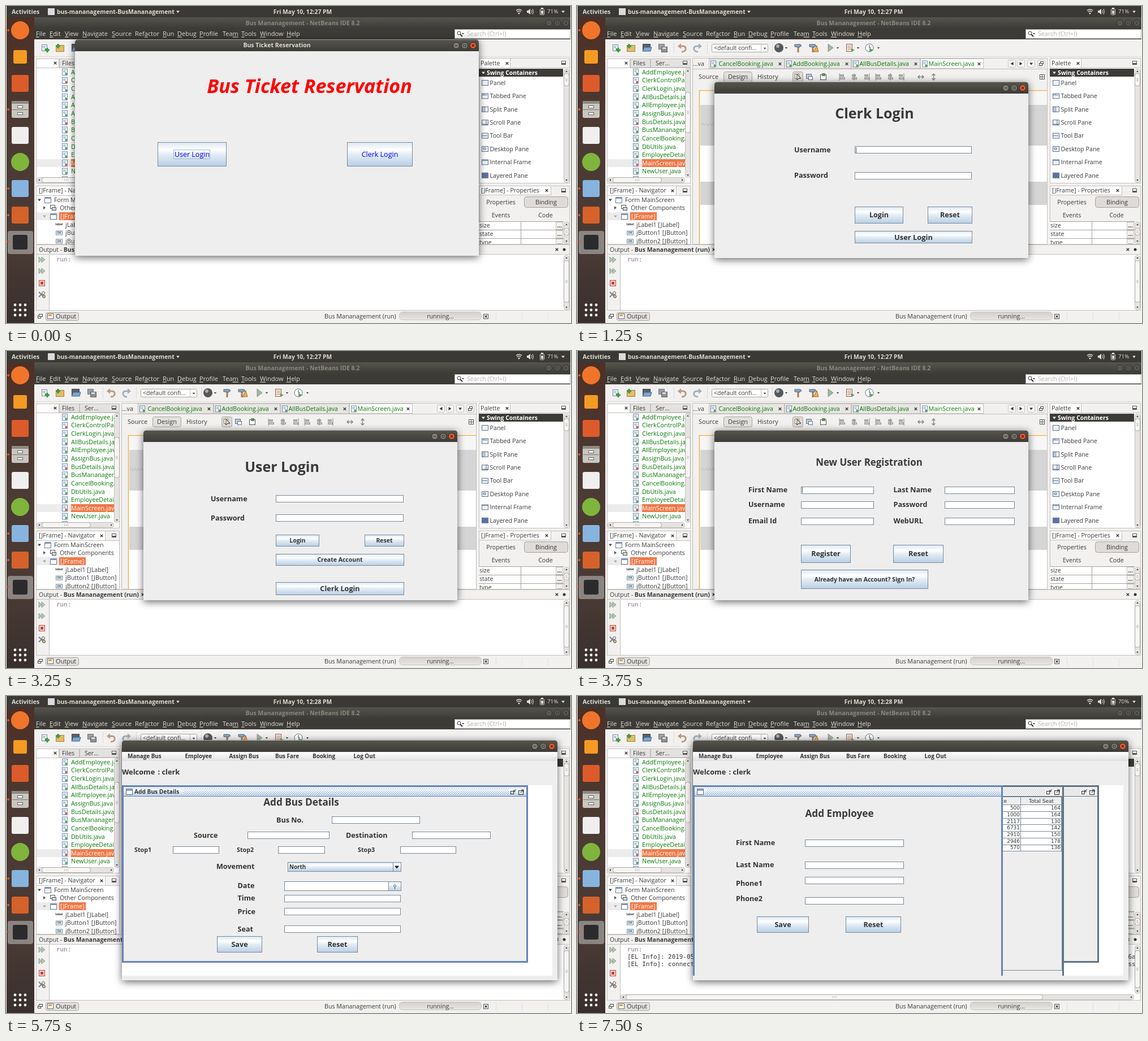
An HTML page for the animation above (8 s loop, 999 px wide and 561 px high).

```html
<!DOCTYPE html>
<html lang="en">
<head>
<meta charset="utf-8">
<title>Bus Ticket Reservation</title>
<style>
html, body { margin: 0; width: 100%; height: 100%; overflow: hidden; background: #fff; }
svg { display: block; }
text { font-family: "Open Sans", "Noto Sans", sans-serif; white-space: pre; }
.mono { font-family: "DejaVu Sans Mono", monospace; }
.cell { font-family: "DejaVu Sans", sans-serif; }
.bold { font-weight: 700; }
.mid { text-anchor: middle; }
.end { text-anchor: end; }
.slant { font-style: italic; }
.shade { filter: drop-shadow(0 3px 7px #0009); }
</style>
</head>
<body>
<svg id="stage" width="999" height="561"></svg>
<script>
const DARK = '#3c3b37', PALE = '#dfdbd2', PANEL = '#f2f1f0', LINE = '#c4c0bb', STEEL = '#7a8a99', ORANGE = '#f07746';

// Basic shapes; boxes are given by left, top, right, bottom
const rect = (x, y, X, Y, fill, stroke, r = 0) => {
  const o = stroke ? .5 : 0;
  return `<rect x="${x + o}" y="${y + o}" width="${X - x - 2 * o}" height="${Y - y - 2 * o}" rx="${r}" fill="${fill}" stroke="${stroke || 'none'}"/>`;
};
const path = (d, stroke = '#444', fill = 'none', w = 1) => `<path d="${d}" stroke="${stroke}" fill="${fill}" stroke-width="${w}"/>`;
const dot = (x, y, r, fill, stroke = 'none') => `<circle cx="${x}" cy="${y}" r="${r}" fill="${fill}" stroke="${stroke}"/>`;
const text = (x, y, s, size = 10.7, fill = '#3a3a3a', cls = '') =>
  `<text x="${x}" y="${y + size * .357}" font-size="${size}" fill="${fill}" class="${cls}">${s}</text>`;
const bold = (x, y, s, size = 12.6, fill = '#333', cls = '') => text(x, y, s, size, fill, 'bold ' + cls);
const each = (list, fn) => list.map(fn).join('');
const clip = (id, s) => `<g clip-path="url(#${id})">${s}</g>`;

// Desktop widgets
const cross = (x, y, c = '#333', r = 2.3) => path(`M${x - r} ${y - r}l${2 * r} ${2 * r}m0 ${-2 * r}l${-2 * r} ${2 * r}`, c, 'none', 1.3);
const caret = (x, y, c = '#444', r = 3) => path(`M${x - r} ${y - r / 2}h${2 * r}l${-r} ${r * 1.3}z`, 'none', c);
const arrow = (x, y, dx, c = '#555') => path(`M${x - dx} ${y - 3}v6l${2 * dx} -3z`, 'none', c);
const minimise = (x, y) => rect(x - 4, y - 3, x + 4, y + 4, '#fff', '#555') + rect(x - 3, y + 1, x + 3, y + 3, '#555');
const thumb = (x, y, X, Y) => rect(x, y, X, Y, '#f6f5f4', '#aaa6a0', 4);
const vbar = (x, y, Y, t, T) => rect(x, y, x + 10, Y, '#e6e4e2', LINE, 4) + thumb(x, t, x + 10, T) +
  path(`M${x + 3} ${y + 6}l2 -3l2 3zM${x + 3} ${Y - 6}l2 3l2 -3z`, 'none', '#555') +
  path(`M${x + 3} ${(t + T) / 2 - 2}h4m-4 2h4m-4 2h4`, LINE);
const hbar = (x, y, X, t, T) => rect(x, y, X, y + 10, '#e6e4e2', LINE, 4) + thumb(t, y, T, y + 10) +
  path(`M${x + 6} ${y + 3}l-3 2l3 2zM${X - 6} ${y + 3}l3 2l-3 2z`, 'none', '#555') +
  path(`M${(t + T) / 2 - 3} ${y + 3}v4m3 -4v4m3 -4v4`, LINE);
const page = (x, y, mark = '#4f9a4f') => rect(x - 5, y - 6, x + 5, y + 6, '#f4f8fc', '#7188a3') +
  path(`M${x - 3} ${y - 2.5}h5m-5 2h4`, '#7f9dbf') + arrow(x + 3, y + 3, 2.2, mark);
const frameIcon = (x, y) => rect(x - 6, y - 5, x + 6, y + 6, '#fff', '#66758a') + rect(x - 6, y - 5, x + 6, y - 2, '#7f93b0');
const panel = (x, y, X, Y) => rect(x, y, X, Y, '#fff', LINE);
const plus = (x, y) => path(`M${x - 4} ${y}h8m-4 -4v8`, '#3c9a3c', 'none', 3);

const circles = (right, y, live) => each([40, 25, 10], (d, i) => {
  const x = right - d, c = live ? (i == 2 ? '#5c1f0c' : '#2f2e2b') : DARK;
  const glyph = [path(`M${x - 2.5} ${y}h5`, c), path(`M${x - 2} ${y - 2}h4v4h-4z`, c), cross(x, y, c, 2)][i];
  return dot(x, y, 5.5, live ? (i == 2 ? '#ee5a2c' : '#807d76') : '#5b5953', '#32312e') + glyph;
});

// Swing widgets
const field = (x, y, X, Y = y + 13) => rect(x, y, X, Y, '#fff', STEEL);
const button = (x, y, X, Y, s, size = 12.6, fill = '#333', cls = 'bold') =>
  rect(x, y, X, Y, 'url(#ocean)', STEEL) + text((x + X) / 2, (y + Y) / 2, s, size, fill, 'mid ' + cls);
const cursor = (x, y) => path(`M${x}.5 ${y}v10`, '#555');
const label = (x, y, s) => bold(x, y, s);
const heading = (x, y, s, size) => bold(x, y, s, size, '#3a3a3a', 'mid');

const dialog = (x, y, X, Y, body, title = '') =>
  rect(x, y, X, Y, '#eee', '', 4).replace('<rect', '<rect class="shade"') +
  path(`M${x} ${y + 21.5}v-16q0 -5 5 -5H${X - 5}q5 0 5 5v16z`, 'none', 'url(#title)') +
  rect(x, y + 21, X, Y, '#eee') + bold((x + X) / 2, y + 10.5, title, 10.5, PALE, 'mid') + circles(X, y + 11, true) + body;

function menuBar() {
  const items = '_File 53,_Edit 77,_View 104,_Navigate 135,_Source 187,Ref_actor 228,_Run 277,_Debug 303,_Profile 342,Tea_m 383,_Tools 416,_Window 449,_Help 496';
  return each(items.split(','), item => {
    const [name, x] = item.split(' ');
    return text(+x, 49.5, name.replace(/_(.)/, '<tspan text-decoration="underline">$1</tspan>'), 11, PALE);
  });
}

function dock() {
  const tile = (y, fill, r = 15) => rect(25 - r, y - r, 25 + r, y + r, fill, '', 3);
  return rect(1, 20, 50, 561, 'url(#dock)') +
    rect(3, 398, 48, 439, '#8b8582', '', 4) +
    dot(25, 43, 16, '#f0752b') + tile(90, '#f59a23', 12) + tile(137, '#dd5b2b') +
    tile(183, '#c9c6c0') + rect(10, 168, 40, 173, '#8d8983') + path('M11 183.5h28', '#77736e') +
    each([178, 190], y => rect(20, y - 2, 30, y + 3, '#fff', '#66625d')) +
    tile(229, '#f1efee') + dot(25, 276, 16, '#7fb53c') + tile(323, '#86b4de') + tile(370, '#d4622a') + tile(418, '#2b2b2e', 13) +
    each([43, 183, 323, 370, 417], y => dot(4, y, 2, '#e95420')) +
    each([0, 1, 2, 3, 4, 5, 6, 7, 8], i => dot(16 + i % 3 * 9, 529 + (i / 3 | 0) * 9, 2.4, '#f4f2f0'));
}

function topPanel() {
  return rect(1, 0, 998, 20, '#3a3935') + bold(10, 10, 'Activities', 10.6, PALE) + rect(74, 4, 86, 16, '#dcdcdc') +
    bold(90, 10, 'bus-mananagement-BusMananagement', 10.35, PALE) + caret(304, 10, PALE) +
    `<g id="clock"></g><g id="battery"></g>` +
    path('M902 8q5 -4 10 0M903.5 10.5q3.500 -3 7 0', PALE, 'none', 1.5) + dot(907, 13, 1.5, PALE) +
    path('M921 8h2l4 -3v10l-4 -3h-2z', 'none', PALE) + path('M929 7q2 3 0 6m2 -8q3 5 0 10', PALE) +
    rect(944, 5, 952, 16, 'none', PALE, 1) + rect(946, 8, 950, 14, PALE) + rect(946, 3, 950, 5, PALE) + caret(985, 10, PALE);
}

function toolbar() {
  return page(68, 74) + plus(73, 78) + rect(88, 69, 103, 81, '#e3bd6a', '#a57e35') + plus(92, 71) +
    rect(116, 67, 130, 80, '#59626b', '#444') + path('M116 80l3 -7h13l-2 7z', '#3f638a', '#7fa6d0') +
    rect(144, 67, 155, 77, '#9aa0a6', '#777') + rect(149, 72, 160, 82, '#8a9096', '#666') + rect(151, 73, 157, 76, '#ddd') +
    path('M180 71h7q6 0 5 6q-1 4 -7 4', '#b99a80', 'none', 3) + path('M178 71l6 -5v10z', 'none', '#b99a80') +
    path('M219 71h-7q-6 0 -5 6q1 4 7 4', '#9fb0bf', 'none', 3) + path('M221 71l-6 -5v10z', 'none', '#9fb0bf') +
    rect(238, 67, 338, 82, '#fff', '#a9a49e', 2) + text(242, 74.500, '&lt;default confi...', 10.5) + path('M325.500 68v13', LINE) + caret(332, 75, '#555', 2.500) +
    dot(357, 74, 8, '#55585a') + dot(355, 71, 3, '#a9adb0') +
    each([391, 417], x => path(`M${x} 71v11`, '#b07a4a', 'none', 3) + path(`M${x - 6} 72v-4h10l2 3h-3v2z`, '#46627d', '#8fa8bf')) +
    path('M424 70l-6 11h9z', '#b07030', '#e5ac55') + path('M444 67v14l9 -7z', '#8d9b8d', '#a4b3a2') +
    rect(476, 67, 487, 81, '#f6f2e8', '#8a5f55') + path('M478 71h7m-7 3h7m-7 3h7', '#c26a5a') + arrow(488, 78, 3, '#58a158') +
    dot(517, 74, 7, '#fff', '#56708f') + path('M517 69v5h3', '#444') + arrow(521, 78, 4, '#58a158') +
    each([370, 461, 497, 533], x => caret(x, 74, '#444', 2.2)) +
    each([171.500, 230.500, 345.500], x => path(`M${x} 64v20`, '#dedbd8'));
}

function files() {
  const names = 'AddEmployee.java,ClerkControlPanel.java,ClerkLogin.java,AllBusDetails.java,AllEmployee.java,AssignBus.java,BusDetails.java,BusMananagement.java,CancelBooking.java,DbUtils.java,EmployeeDetails.java,MainScreen.java,NewUser.java,ShowUserDetails.java';
  return panel(53, 109, 201, 314) + rect(53, 93, 94, 110, '#fff', LINE) + rect(94, 93, 130, 109, '#e4e2e0', LINE) + rect(130, 93, 201, 109, '#e4e2e0', LINE) +
    cross(87, 101) + text(99, 101, 'Files') + text(139, 101, 'Ser...') + minimise(191, 100) +
    rect(54, 271, 115, 285, '#ececec') +
    clip('list', rect(115, 271, 191, 285, ORANGE) + each(names.split(','), (name, i) => {
      const y = 117 + i * 14.63;
      return page(104, y, i % 5 == 1 ? '#c05040' : '#4f9a4f') + text(115, y, name, 10.8, i == 11 ? '#fff' : '#087a08');
    })) + vbar(191, 110, 304, 152, 225) + hbar(54, 303, 191, 63, 150);
}

function navigator() {
  return panel(53, 335, 201, 422) + rect(53, 318, 201, 336, PANEL, LINE) + rect(53, 318, 176, 336, '#fff', LINE) +
    text(58, 326.500, '[JFrame] - Navigator') + cross(169, 327) + minimise(191, 326) +
    caret(59, 343) + frameIcon(74, 343) + text(85, 343, 'Form MainScreen') +
    arrow(68, 357, 2) + rect(78, 352, 87, 359, '#fff', '#555') + rect(81, 356, 89, 362, '#cfd8e4', '#555') + text(95, 357.500, 'Other Components') +
    rect(54, 365, 94, 379, '#ececec') + caret(68, 372, '#aaa') + frameIcon(84, 372) + rect(94, 365, 141, 379, ORANGE) + text(96, 372, '[JFrame]', 10.7, '#fff') +
    bold(94, 386, 'label', 5.500, '#333', 'mid') + text(105, 387, 'jLabel1 [JLabel]') +
    each([1, 2], i => { const y = 387 + i * 14.6; return rect(88, y - 4, 100, y + 4, '#e8eef5', '#7a8fa5') + bold(94, y, 'OK', 5, '#456', 'mid') + text(105, y, `jButton${i} [JButton]`); });
}

function editor() {
  const tabs = [['CancelBooking.java', 233, 367], ['AddBooking.java', 367, 485], ['AllBusDetails.java', 485, 607], ['MainScreen.java', 607, 719]];
  const nav = [[769, -2.500], [785, 2.500]];
  return rect(204, 92, 832, 422, PANEL, LINE) + text(205, 102.500, '...va') +
    each(tabs, ([name, x, X], i) => rect(x, 93, X, 111, i == 3 ? '#fff' : '#e8e6e4', LINE) + page(x + 8, 102.500) +
      text(x + (i ? 14.500 : 17.500), 102.500, name, 10.7, '#087a08') + cross(X - 8, 102.500)) +
    each([762, 778, 796, 814], x => rect(x, 95, x + 14, 109, '#f7f6f5', LINE, 2)) +
    each(nav, ([x, d]) => arrow(x, 102, d, '#333')) + caret(803, 102, '#333') + rect(819, 98, 825, 103, '#fff', '#444') + rect(817, 101, 823, 106, '#fff', '#444') +
    path('M205 111.500h627', LINE) + text(215, 125.500, 'Source', 11) + rect(259, 116, 310, 135, '#e3e1df', '#a9a49e', 3) + text(267, 125.500, 'Design', 11) + text(319, 125.500, 'History', 11) +
    rect(381, 116, 400, 135, '#dcd9d6', '#a9a49e', 3) + rect(385, 120, 393, 129, '#fff', '#8a7a50') + path('M389 121v10l3 -3h4z', '#222', '#fff') +
    rect(405, 120, 415, 129, '#b9cbe0', '#66758a') + rect(409, 124, 417, 131, '#fff', '#66758a') + rect(430, 121, 441, 131, '#fff', '#555') + rect(433, 119, 439, 124, '#5d8a5d') +
    each([469, 490, 512, 533, 554, 573], (x, i) => rect(x - 4, 121, x + 3, 125, '#b8b6b4', '#999') + rect(x - 4, 126, x + 5, 130, '#c9c7c5', '#999') + path(`M${x + (i % 3 - 1) * 5} 119v13`, '#888')) +
    path('M603 125.500h10m-7 -3l-3 3l3 3m4 -6l3 3l-3 3M630.500 120v11m-3 -8l3 -3l3 3m-6 5l3 3l3 -3', '#888', 'none', 1.5) + rect(818, 121, 827, 130, '#fff', '#555') + path('M822.500 121v9m-4 -4.500h8', '#555') +
    rect(205, 138, 831, 421, '#fff') + rect(205, 138, 216, 421, PANEL) + rect(205, 138, 831, 148, PANEL) +
    path('M216.500 421V149.500H831', '#efae4a', 'none', 1.5) + rect(218, 151, 831, 175, '#f6f6f6') + rect(218, 175, 831, 247, '#d5d5d5') + rect(218, 311, 831, 352, '#d5d5d5') +
    path('M219 212' + 'l3 -5l3 5'.repeat(5), '#bfbfbf');
}

function palette() {
  const names = ['Panel', 'Tabbed Pane', 'Split Pane', 'Scroll Pane', 'Tool Bar', 'Desktop Pane', 'Internal Frame', 'Layered Pane'];
  const detail = ['', 'M842 134h9m-6 -2v2', 'M846.500 131v10m-3 -10v10', 'M849 131v10m-7 -2h10', 'M842 136h9', 'M844 134h4v3h-4z', 'M842 133h10', 'M844 134h4v4h-4z'];
  return panel(836, 109, 997, 314) + rect(836, 92, 997, 110, PANEL, LINE) + rect(836, 92, 892, 110, '#fff', LINE) + text(839, 101.500, 'Palette') + cross(886, 101.500) + minimise(986, 100) +
    rect(836, 111, 985, 125, DARK) + caret(844, 118, '#fff') + bold(850, 118, 'Swing Containers', 10.4, '#fff') +
    each(names, (name, i) => `<g transform="translate(0 ${i * 23.4})">` + rect(841, 131, 853, 141, i == 7 ? '#5b78b5' : '#eef2f7', '#5f6f85') + path(detail[i], '#53698c') + text(855.500, 136, name) + '</g>') +
    vbar(986, 111, 313, 119, 142);
}

function properties() {
  return rect(836, 318, 997, 422, PANEL, LINE) + rect(836, 318, 964, 335, '#fff', LINE) + text(840, 326.500, '[JFrame] - Properties') + cross(956, 326.500) + minimise(986, 326) +
    text(875, 347, 'Properties', 10.7, '#3a3a3a', 'mid') + rect(916, 337, 994, 357, '#dedbd8', '#a9a49e', 4) + text(955, 347, 'Binding', 10.7, '#3a3a3a', 'mid') +
    text(875, 370, 'Events', 10.7, '#3a3a3a', 'mid') + text(954, 370, 'Code', 10.7, '#3a3a3a', 'mid') + rect(836, 381, 986, 421, '#fff') +
    clip('props', each(['size', 'state', 'type'], (name, i) => {
      const y = 381 + i * 15;
      return path(`M836 ${y + .5}h150`, '#a5a29e') + text(837, y + 7.500, name) + rect(972, y + 1, 985, y + 15, PANEL, LINE) + bold(978.500, y + 7, '...', 10, '#333', 'mid');
    })) + path('M910.500 381v40', '#a5a29e') + vbar(986, 382, 421, 393, 406);
}

function output() {
  return rect(53, 422, 997, 440, PANEL, LINE) + text(58, 431, 'Output - <tspan class="bold">Bus Mananagement (run)</tspan>', 10.5) + cross(242, 431) + cross(974, 431) + dot(987, 431, 2.500, '#333') +
    rect(53, 439, 997, 539, '#fff', LINE) + rect(54, 440, 77, 538, PANEL) + path('M76.500 440v98', LINE) +
    each([449, 469], y => path(`M58 ${y - 5}v10l5 -5zM63 ${y - 5}v10l6 -5z`, '#8fa08f', '#b5c8b3')) +
    rect(58, 485, 69, 496, '#f2d4d0', '#b5483f') + rect(61, 488, 66, 493, '#d0453c') +
    path('M58 506l9 9m0 -9l-9 9', '#78828c', 'none', 2) + dot(66, 508, 2.500, '#fff', '#555') + dot(67, 514, 2.500, '#d8c27a', '#555') +
    text(89, 448.500, 'run:', 10.9, '#8a6f8a', 'mono') + vbar(986, 441, 538, 450, 525) +
    rect(56, 548, 62, 553, '#fff', '#444') + rect(58, 545, 65, 550, '#fff', '#444') +
    rect(70, 542, 129, 557, '#e3e1df', '#a9a49e', 3) + rect(73, 544, 84, 554, '#fff', '#667') + rect(75, 546, 81, 549, '#e1a23d') + text(88, 549.500, 'Output', 10.9) +
    text(563, 549, 'Bus Mananagement (run)', 10.7) + rect(695, 541, 841, 556, 'url(#trough)', '#c9c5c0', 6) + '<g id="progress"></g>' +
    rect(844, 545, 853, 554, '#fff', '#555') + cross(848.500, 549.500, '#333', 2) + path('M866.500 543v14m46 -14v14m46 -14v14', '#e2dfdc');
}

const desktop = () => rect(1, 20, 998, 561, PANEL) + rect(50, 20, 998, 40, 'url(#title)') + rect(50, 40, 998, 59, DARK) +
  bold(524.500, 30, 'Bus Mananagement - NetBeans IDE 8.2', 10.5, '#8b8881', 'mid') + circles(1000, 30, false) + menuBar() +
  rect(793, 41, 998, 58, '#fff', '#aaa') + dot(801, 48, 3, 'none', '#333') + path('M803 50l4 4', '#333', 'none', 2) + caret(808, 49, '#333', 2) + text(815, 49.500, 'Search (Ctrl+I)', 10.7, '#b3b0ad') +
  toolbar() + path('M50 89.500h948', '#dedbd8') + files() + navigator() + editor() + palette() + properties() + output() + dock() + topPanel();

const home = () => dialog(122, 59, 836, 442,
  text(536.500, 142, 'Bus Ticket Reservation', 34, '#f00', 'bold slant mid') +
  button(268, 241, 390, 284, 'User Login', 12.500, '#00f', '') + rect(296, 254, 361, 271, 'none', '#a3b8cc') +
  button(603, 241, 719, 284, 'Clerk Login', 12.500, '#00f', ''), 'Bus Ticket Reservation');

const staffLogin = () => dialog(243, 134, 798, 446, heading(526, 190, 'Clerk Login', 25) +
  label(384, 254.500, 'Username') + label(384, 300, 'Password') + field(491, 248, 698) + field(491, 294, 698) + cursor(493, 250) +
  button(491, 355, 577, 385, 'Login') + button(620, 355, 699, 385, 'Reset') + button(491, 398, 699, 420, 'User Login', 12.9));

const userLogin = () => dialog(243, 140, 798, 441, heading(488, 205, 'User Login', 25) +
  label(362, 261.500, 'Username') + label(362, 295.500, 'Password') + field(477, 255, 703) + field(477, 289, 703) +
  button(477, 325, 554, 346, 'Login', 10.500) + button(634, 325, 704, 346, 'Reset', 10.500) +
  button(477, 359, 704, 380, 'Create Account', 10.500) + button(477, 409, 704, 432, 'Clerk Login'));

const register = () => dialog(243, 140, 798, 441, heading(516.500, 197, 'New User Registration', 16.9) +
  each([['First Name', 'Last Name', 246], ['Username', 'Password', 271.500], ['Email Id', 'WebURL', 300.500]], ([a, b, y]) =>
    label(303, y, a) + label(559.500, y, b) + field(396, Math.round(y - 6), 525) + field(650, Math.round(y - 6), 774)) + cursor(398, 241) +
  button(396, 343, 484, 375, 'Register') + button(559, 343, 648, 375, 'Reset') + button(396, 387, 621, 421, 'Already have an Account? Sign In?', 10.500));

// Windows inside the main control panel
function inner(X, Y, title, active, body, controls = true) {
  const edge = active ? '#6382bf' : '#5f7383', bumps = title ? 235 + title.length * 5.2 : 230;
  return rect(205, 158, X, Y, edge) + rect(208, 161, X - 3, Y - 3, '#eee') + rect(208, 162, X - 3, 177, active ? 'url(#ocean)' : '#eee') +
    rect(bumps, 164, X - (controls ? 33 : 5), 176, `url(#${active ? 'bumps' : 'dull'})`) + path(`M208 177.500H${X - 3}`, edge) +
    rect(212, 164, 224, 175, '#fff', '#5a6a80') + path('M213 166.500h10', '#6382bf', 'none', 2) + bold(227, 169, title, 10.2) +
    (controls ? rect(X - 31, 168, X - 25, 174, 'none', '#333') + path(`M${X - 21} 165l-4 4m0 -3v3h3`, '#222') + rect(X - 17, 167, X - 8, 175, 'none', '#333') + path(`M${X - 13} 171l5 -5m-4 0h4v4`, '#222') : '') + body;
}

const addBus = active => inner(923, 472, 'Add Bus Details', active, heading(522, 187.500, 'Add Bus Details', 17.2) +
  label(478, 220, 'Bus No.') + field(576, 213, 732) + label(332, 246.500, 'Source') + field(427, 240, 572) + label(601, 246.500, 'Destination') + field(718, 240, 857) +
  each([[227, 295, 377], [408, 481, 564], [622, 697, 796]], ([x, l, r], i) => bold(x, 272.500, 'Stop' + (i + 1), 10.700) + field(l, 266, r)) +
  label(372, 302, 'Movement') + rect(498, 294, 699, 311, 'url(#ocean)', STEEL) + bold(501, 302.500, 'North', 9.800) + path('M684.500 294v17', STEEL) + caret(691, 302.500, '#222', 4) +
  label(409.500, 336, 'Date') + field(492, 328, 677, 345) + button(676, 328, 699, 345, '') + dot(687.500, 336, 2, '#fff', '#456') + path('M687.500 338v4', '#456') +
  each([['Time', 358, 352], ['Price', 381.500, 375], ['Seat', 412.500, 406]], ([s, y, top]) => label(409.500, y, s) + field(492, top, 698)) +
  button(373, 425, 453, 454, 'Save') + button(550, 425, 622, 454, 'Reset'));

function allBuses(active) {
  const heads = 'Id,Bus No,Movement,Bus Source,Bus Dest,Depart Date,Depart Time,Price,Total Seat'.split(',');
  const rows = `MH-3621,Item 2,Howrah,Bokaro,1 Jun,500,164
WB-5621,North,Ranchi,Lucknow,6 May,1000,164
HY-7234,North,Jharkhand,Haryana,17 May,2117,130
JH-8451,South,Kalyani,Hydrabad,14 Jun,6731,142
WB-4518,West,Delhi,Mumbai,12 Jul,2910,150
MH-67533,South,Bilaspur,Banglore,11 Jun,2946,178
DH-9106,East,Delhi,Bihar,7 Jul,570,136`.split('\n');
  const left = i => 209 + i * 72, size = 8.950;
  return inner(861, 499, 'All Bus Details', active, rect(208, 178, 858, 486, '#eee', STEEL) + rect(209, 192, 857, 274, '#fff') +
    each(heads, (s, i) => text(left(i) + 36, 185.500, s, size, '#333', 'cell mid') + path(`M${left(i + 1) - .5} 178v96`, STEEL)) + path('M209 192.500h648', STEEL) +
    each(rows, (row, r) => {
      const [no, way, from, to, day, price, seats] = row.split(','), y = 198 + r * 11.7;
      return path(`M209 ${Math.round(y + 6) + .5}h648`, STEEL) + each([r + 1, no, way, from, to, day + ', 2019', '1 Jan, 1970', price, seats], (s, i) =>
        i % 7 && i < 8 ? text(left(i) + 1, y, s, size, '#333', 'cell') : text(left(i + 1) - 2, y, s, size, '#333', 'cell end'));
    }));
}

const addEmployee = () => inner(753, 499, '', true, heading(464, 207.500, 'Add Employee', 17.2) +
  each([['First Name', 260, 254], ['Last Name', 299, 293], ['Phone1', 331.500, 320], ['Phone2', 359, 356]], ([s, y, top]) => label(281, y, s) + field(403, top, 578)) +
  button(318, 390, 410, 419, 'Save') + button(475, 390, 573, 419, 'Reset'), false);

const controlPanel = frames => dialog(205, 78, 975, 503, rect(205, 99, 975, 115, 'url(#menu)') +
  each([['Manage Bus', 215], ['Employee', 316.500], ['Assign Bus', 394.500], ['Bus Fare', 476], ['Booking', 542], ['Log Out', 614.500]], ([s, x]) => bold(x, 106.500, s, 9.900)) +
  bold(205, 134.500, 'Welcome', 12.8) + bold(268.500, 134.500, ':', 12.8) + bold(275.500, 134.500, 'clerk', 12.8) +
  rect(205, 158, 966, 495, '#fff') + clip('pane', frames));

const log = () => rect(78, 440, 996, 538, '#fff') + text(89, 448.500, 'run:', 10.9, '#8a6f8a', 'mono') +
  each([['2019-05-10', 'd6a', 461], ['connected', 'ass', 474.500]], ([a, b, y]) => text(89, y, '[EL Info]: ' + a, 10.9, '#333', 'mono') + text(968, y, b, 10.9, '#333', 'mono')) +
  vbar(986, 441, 527, 450, 517) + hbar(77, 528, 985, 86, 824);

const gradient = (id, ...stops) => `<linearGradient id="${id}" x2="0" y2="1">${each(stops, ([at, c]) => `<stop offset="${at}" stop-color="${c}"/>`)}</linearGradient>`;
const area = (id, ...box) => `<clipPath id="${id}">${rect(...box, '#000')}</clipPath>`;
const bumps = (id, c) => `<pattern id="${id}" width="4" height="4" patternUnits="userSpaceOnUse"><path d="M0 0h1v1h-1zM2 2h1v1h-1z" fill="${c}"/><path d="M1 1h1v1h-1zM3 3h1v1h-1z" fill="#fff"/></pattern>`;
const defs = gradient('title', [0, '#56544d'], [1, '#3c3b37']) + gradient('dock', [0, '#4d3026'], [.4, '#4b3b34'], [.75, '#4a3a34'], [1, '#38302e']) +
  gradient('ocean', [0, '#dde8f3'], [.3, '#fff'], [.5, '#e4edf5'], [1, '#b8cfe5']) + gradient('trough', [0, '#d3d0cc'], [1, '#e8e6e4']) + gradient('menu', [0, '#fff'], [1, '#e0e0e0']) +
  area('list', 54, 110, 191, 303) + area('props', 836, 381, 986, 421) + area('pane', 205, 158, 966, 495) + bumps('bumps', '#6f8fc4') + bumps('dull', '#a9b2bb');

const scenes = [home(), staffLogin(), userLogin(), register(), controlPanel(addBus(true)),
  log() + controlPanel(addBus(false) + allBuses(true)), log() + controlPanel(addBus(false) + allBuses(false) + addEmployee())];

const $ = id => document.getElementById(id);
$('stage').innerHTML = `<defs>${defs}</defs>${desktop()}<g id="scene"></g>`;

let shown = -1;
function draw() {
  const step = Math.floor(performance.now() % 8000 / 1250);
  if (step != shown) {
    shown = step;
    $('scene').innerHTML = scenes[step];
    $('clock').innerHTML = bold(524.500, 10, `Fri May 10, 12:${step < 4 ? 27 : 28} PM`, 10.3, PALE, 'mid');
    $('battery').innerHTML = text(957, 10, step < 6 ? '71%' : '70%', 9.800, PALE);
    $('progress').innerHTML = step == 5 ? rect(763, 541, 789, 556, ORANGE, '#c9592c', 5) : text(768, 549.500, 'running...', 10.7, '#3a3a3a', 'mid');
  }
  requestAnimationFrame(draw);
}
draw();
</script>
</body>
</html>
```
